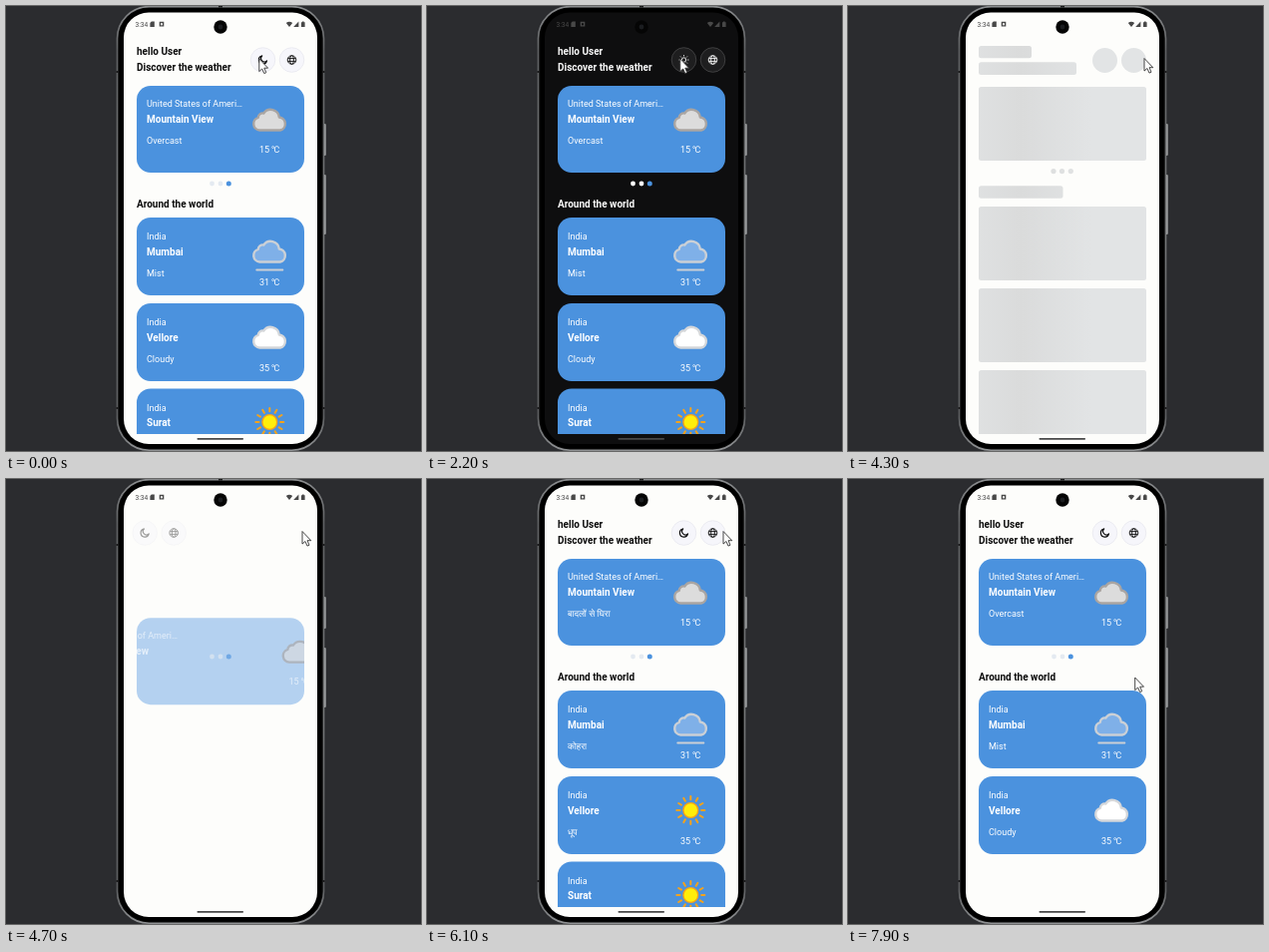
These frames come from a looping animation (416x446 px, 8000 ms). An HTML page:

```html
<!DOCTYPE html>
<html lang="en">
<head>
<meta charset="utf-8">
<title>Weather app</title>
<style>
html, body { margin: 0; width: 100%; height: 100%; overflow: hidden; background: #2b2c2f; }
svg { display: block; width: 416px; height: 446px; font-family: Roboto, "Noto Sans", "Noto Sans CJK SC", sans-serif; }
.bold { font-size: 10px; font-weight: 700; }
.plain { font-size: 9px; }
.ink { fill: var(--ink); }
.line { fill: none; stroke: var(--ink); }
.status { fill: #484848; }
.card text { fill: #fff; }
</style>
</head>
<body>
<svg id="stage" viewBox="0 0 416 446">
  <defs>
    <clipPath id="screenClip"><rect x="118" y="6.5" width="194" height="432.5" rx="25"/></clipPath>
    <clipPath id="listClip"><rect x="118" y="30" width="194" height="399"/></clipPath>
    <linearGradient id="rim" x2="0" y2="1">
      <stop offset="0" stop-color="#8b8d8f"/><stop offset=".1" stop-color="#5f6163"/>
      <stop offset=".5" stop-color="#77797a"/><stop offset=".92" stop-color="#5c5e60"/>
      <stop offset="1" stop-color="#909294"/>
    </linearGradient>
    <linearGradient id="shimmer" gradientUnits="userSpaceOnUse" x1="-70" x2="70" y1="0" y2="0">
      <stop offset="0" stop-color="#e2e4e5"/><stop offset=".5" stop-color="#dadbdb"/>
      <stop offset="1" stop-color="#e2e4e5"/>
    </linearGradient>
    <path id="cloud" d="M-10 10.5A6.5 6.5 0 0 1-11.5-2.2A4.5 4.5 0 0 1-6-6.5A8.5 8.5 0 0 1 9.5-2.5A6.6 6.6 0 0 1 10.5 10.5Z" stroke-width="2.4" stroke-linejoin="round"/>
    <g id="overcast"><use href="#cloud" fill="#dcdcdc" stroke="#aaa5a2"/></g>
    <g id="cloudy"><use href="#cloud" fill="#fff" stroke="#d5d7da"/></g>
    <g id="mist">
      <use href="#cloud" fill="#7fb0e8" stroke="#cbd0d6"/>
      <path d="M-13 18.5H13" stroke="#cbd0d6" stroke-width="2" stroke-linecap="round"/>
    </g>
    <g id="sunny">
      <g id="rays" stroke="#f5a21b" stroke-width="2" stroke-linecap="round"></g>
      <circle r="7.4" fill="#ffee0a" stroke="#f5a21b" stroke-width="1.4"/>
    </g>
  </defs>

  <!-- phone body -->
  <g fill="#a3a5a6">
    <rect x="318.5" y="118" width="2.2" height="32" rx="1"/>
    <rect x="318.5" y="169" width="2.2" height="60" rx="1"/>
  </g>
  <rect x="111.5" y=".6" width="207" height="444.6" rx="32" fill="#0a0a0a" stroke="url(#rim)" stroke-width="1.6"/>
  <rect x="113.5" y="2" width="203" height="441.6" rx="30" fill="#000"/>
  <path d="M110.5 66h2.5M110.5 403h2.5M317 66h2.5M317 403h2.5M213 .5h4" stroke="#1c1c1d" stroke-width="2"/>

  <g clip-path="url(#screenClip)">
    <rect x="117" y="6" width="196" height="434" fill="var(--bg)"/>
    <g clip-path="url(#listClip)">
      <g id="page">
        <g id="header">
          <text class="bold ink" x="131" y="49.3">hello User</text>
          <text class="bold ink" x="131" y="65.2">Discover the weather</text>
          <g id="themeBtn" transform="translate(257.5 54)">
            <circle r="12.3" fill="var(--btn)" stroke="var(--edge)" stroke-width=".8"/>
            <circle class="ripple" r="12.5" fill="#999"/>
            <path id="moon" class="line" d="M-.8-4A4.1 4.1 0 1 0 4 .9A3.4 3.4 0 0 1-.8-4Z" stroke-width="1.2" stroke-linejoin="round"/>
            <g id="lightIcon" class="line" stroke-width=".9"><circle r="2.2"/><path id="ticks"/></g>
          </g>
          <g id="langBtn" transform="translate(286.5 54)">
            <circle r="12.3" fill="var(--btn)" stroke="var(--edge)" stroke-width=".8"/>
            <circle class="ripple" r="12.5" fill="#999"/>
            <g class="line" stroke-width=".9">
              <circle r="4.3"/><ellipse rx="1.9" ry="4.3"/><path d="M-4-1.4H4M-4 1.4H4"/>
            </g>
          </g>
        </g>
        <g id="cards"></g>
        <g id="dots">
          <circle cx="206.5" cy="178" r="2.4" fill="var(--dot)"/>
          <circle cx="215" cy="178" r="2.4" fill="var(--dot)"/>
          <circle cx="223.3" cy="178" r="2.5" fill="#4b92de"/>
        </g>
        <text id="heading" class="bold ink" x="131" y="201.8">Around the world</text>
      </g>
      <g id="skeleton" fill="url(#shimmer)"></g>
    </g>

    <!-- system bars -->
    <g class="status">
      <text x="129.5" y="20.8" font-size="6.6">3:34</text>
      <path d="M145.8 15.5h3v5.4h-4.4v-4z"/>
      <path d="M153.7 15.8h4.6v4.8h-4.6zM155 17.2v2h2v-2z" fill-rule="evenodd"/>
      <path d="M280.8 17q3.2-2.4 6.4 0l-3.2 4z"/>
      <path d="M293.4 15.6v5.4h-5.2z"/>
      <path d="M296 16.3h1v-.8h1.6v.8h1V21H296z"/>
      <rect x="191.5" y="433" width="46.5" height="1.7" rx=".8"/>
    </g>
    <circle cx="215" cy="21" r="6.7" fill="#050505"/>
    <circle cx="215" cy="21" r="2.4" fill="#1b1d20"/>
  </g>

  <path id="cursor" d="M0 0V12.6L2.9 10L5 14.6L7 13.7L5 9.2H8.8Z" fill="#fff" stroke="#333" stroke-width=".9" stroke-linejoin="round"/>
</svg>

<script>
const LOOP = 8000, STEP = 100;
const $ = id => document.getElementById(id);
const clamp = v => Math.min(1, Math.max(0, v));
const ramp = (t, a, b) => clamp((t - a) / (b - a));
const move = (el, x, y) => el.setAttribute('transform', `translate(${x} ${y})`);
const show = (el, on) => { el.style.display = on ? '' : 'none'; };

// cubic-bezier(.25, .1, .25, 1)
function ease(x) {
  const curve = (u, a, b) => 3 * u * (1 - u) ** 2 * a + 3 * u * u * (1 - u) * b + u ** 3;
  let lo = 0, hi = 1;
  for (let i = 0; i < 20; i++) {
    const mid = (lo + hi) / 2;
    if (curve(mid, .25, .25) < x) lo = mid; else hi = mid;
  }
  return x <= 0 ? 0 : x >= 1 ? 1 : curve(lo, .1, 1);
}

const mix = (a, b, k) => `rgb(${a.map((v, i) => Math.round(v + (b[i] - v) * k))})`;
const THEME = {
  bg: [[253, 253, 251], [14, 14, 15]],
  ink: [[12, 12, 12], [250, 250, 250]],
  btn: [[246, 246, 251], [30, 30, 31]],
  edge: [[233, 233, 239], [72, 72, 74]],
  dot: [[228, 234, 241], [255, 255, 255]]
};

const CARDS = [
  { y: 80, h: 87, place: 'United States of Ameri…', city: 'Mountain View', en: 'Overcast', hi: 'बादलों से घिरा', temp: 15, icon: 'overcast' },
  { y: 212, h: 78, place: 'India', city: 'Mumbai', en: 'Mist', hi: 'कोहरा', temp: 31, icon: 'mist' },
  { y: 298, h: 78, place: 'India', city: 'Vellore', en: 'Cloudy', hi: 'धूप', temp: 35, icon: 'cloudy', hiIcon: 'sunny' },
  { y: 383.5, h: 78, place: 'India', city: 'Surat', en: 'Sunny', hi: 'धूप', temp: 36, icon: 'sunny' }
];

// Load phases: placeholder start, then the entry start of each card
const LOADS = [
  { from: 3650, lang: 'hi', starts: [4600, 4792, 4924, 5000] },
  { from: 6350, lang: 'en', starts: [7242, 7352, 7482, 7830] }
];
const CLICKS = { themeBtn: [650, 2200], langBtn: [3500, 6200] };
const CURSOR = [[0, 253.8, 53], [2750, 253.8, 53], [3150, 295.5, 52.5], [3700, 295.5, 52.5],
  [3900, 297, 52.5], [7350, 297, 52.5], [7850, 287.7, 199], [LOOP, 287.7, 199]];

function spokes(n, r1, r2) {
  return Array.from({ length: n }, (_, i) => {
    const a = i * 2 * Math.PI / n, c = Math.cos(a), s = Math.sin(a);
    return `M${c * r1} ${s * r1}L${c * r2} ${s * r2}`;
  }).join('');
}
$('rays').innerHTML = `<path d="${spokes(12, 10.8, 14)}"/>`;
$('ticks').setAttribute('d', spokes(8, 3.6, 4.9));

$('cards').innerHTML = CARDS.map((c, i) => {
  const d = i ? 1 : 0;
  return `<g class="card">
    <clipPath id="c${i}"><rect x="131" width="168" height="${c.h}" rx="14"/></clipPath>
    <rect class="back" x="131" width="168" height="${c.h}" rx="14" fill="#4b92de"/>
    <g class="inner" clip-path="url(#c${i})">
      <g class="words">
        <text class="plain" x="141" y="${21.3 + d}">${c.place}</text>
        <text class="bold" x="141" y="${36.7 + d}">${c.city}</text>
        <text class="plain cond" x="141" y="${58 + d}"></text>
      </g>
      <g class="side">
        <use class="icon" x="264.3" y="${i === 3 ? 33.5 : 34}"/>
        <text class="plain" x="264" y="${67.3 + d}" text-anchor="middle">${c.temp} ℃</text>
      </g>
    </g></g>`;
}).join('');
const cardEls = [...document.querySelectorAll('.card')].map(el => {
  const part = name => el.querySelector('.' + name);
  return { el, back: part('back'), inner: part('inner'), words: part('words'), side: part('side'), cond: part('cond'), icon: part('icon') };
});

const bar = (x, y, w, h) => `<rect x="${x}" y="${y}" width="${w}" height="${h}" rx="2.5"/>`;
const disc = (x, y, r) => `<circle cx="${x}" cy="${y}" r="${r}"/>`;
$('skeleton').innerHTML =
  bar(131, 40, 53, 12.3) + bar(131, 56.3, 98, 12.7) + bar(131, 81, 168, 74) + bar(131, 180.3, 84.5, 12.5) +
  [201, 283, 365].map(y => bar(131, y, 168, 74)).join('') +
  disc(257.5, 54.5, 12.5) + disc(286.5, 54.5, 12.5) +
  [206, 214.5, 223.3].map(x => disc(x, 165.6, 2.6)).join('');

function cursorAt(t) {
  const i = CURSOR.findIndex(p => p[0] > t);
  const [t0, x0, y0] = CURSOR[i - 1], [t1, x1, y1] = CURSOR[i];
  const k = ease(ramp(t, t0, t1));
  return [x0 + (x1 - x0) * k, y0 + (y1 - y0) * k];
}

function drawTheme(t) {
  const dark = ramp(t, 650, 850) - ramp(t, 2200, 2400);
  for (const name in THEME) $('stage').style.setProperty('--' + name, mix(...THEME[name], dark));
  show($('moon'), dark < .5);
  show($('lightIcon'), dark >= .5);
  for (const id in CLICKS) {
    const glow = Math.max(...CLICKS[id].map(c => ramp(t, c, c + 100) - ramp(t, c + 270, c + 550)));
    $(id).querySelector('.ripple').style.opacity = glow * (.25 + .35 * dark);
  }
}

function drawCards(t, load) {
  const lang = load ? load.lang : 'en';
  CARDS.forEach((c, i) => {
    const e = cardEls[i], age = load ? t - load.starts[i] : LOOP;
    const p = ease(clamp(age / 400));
    const q = i ? ease(clamp(age / 200)) : p;
    move(e.el, 0, c.y + 100 * (1 - p));
    e.back.style.opacity = p;
    e.inner.style.opacity = Math.sqrt(p);
    move(e.words, -110 * (1 - q), 0);
    move(e.side, 50 * (1 - q), 0);
    e.cond.textContent = c[lang];
    e.icon.setAttribute('href', '#' + (lang === 'hi' && c.hiIcon || c.icon));
  });
}

function draw(t) {
  const load = LOADS.filter(l => t >= l.from).pop();
  const loading = !!load && t < load.starts[0];
  show($('page'), !loading);
  show($('skeleton'), loading);
  if (loading) {
    const x = (t - load.from) % 1500 / 1500 * 400;
    $('shimmer').setAttribute('gradientTransform', `translate(${x} 0)`);
  }
  drawTheme(t);
  drawCards(t, load);

  const p = load ? ease(clamp((t - load.starts[0]) / 400)) : 1;
  for (const id of ['header', 'heading']) {
    move($(id), -200 * (1 - p), 0);
    $(id).style.opacity = p;
  }
  $('dots').style.opacity = Math.sqrt(p);
  move($('cursor'), ...cursorAt(t));
}

let start;
function tick() {
  const now = performance.now();
  start ??= now;
  draw(Math.floor((now - start + 10) / STEP) * STEP % LOOP);
  requestAnimationFrame(tick);
}
tick();
</script>
</body>
</html>
```
